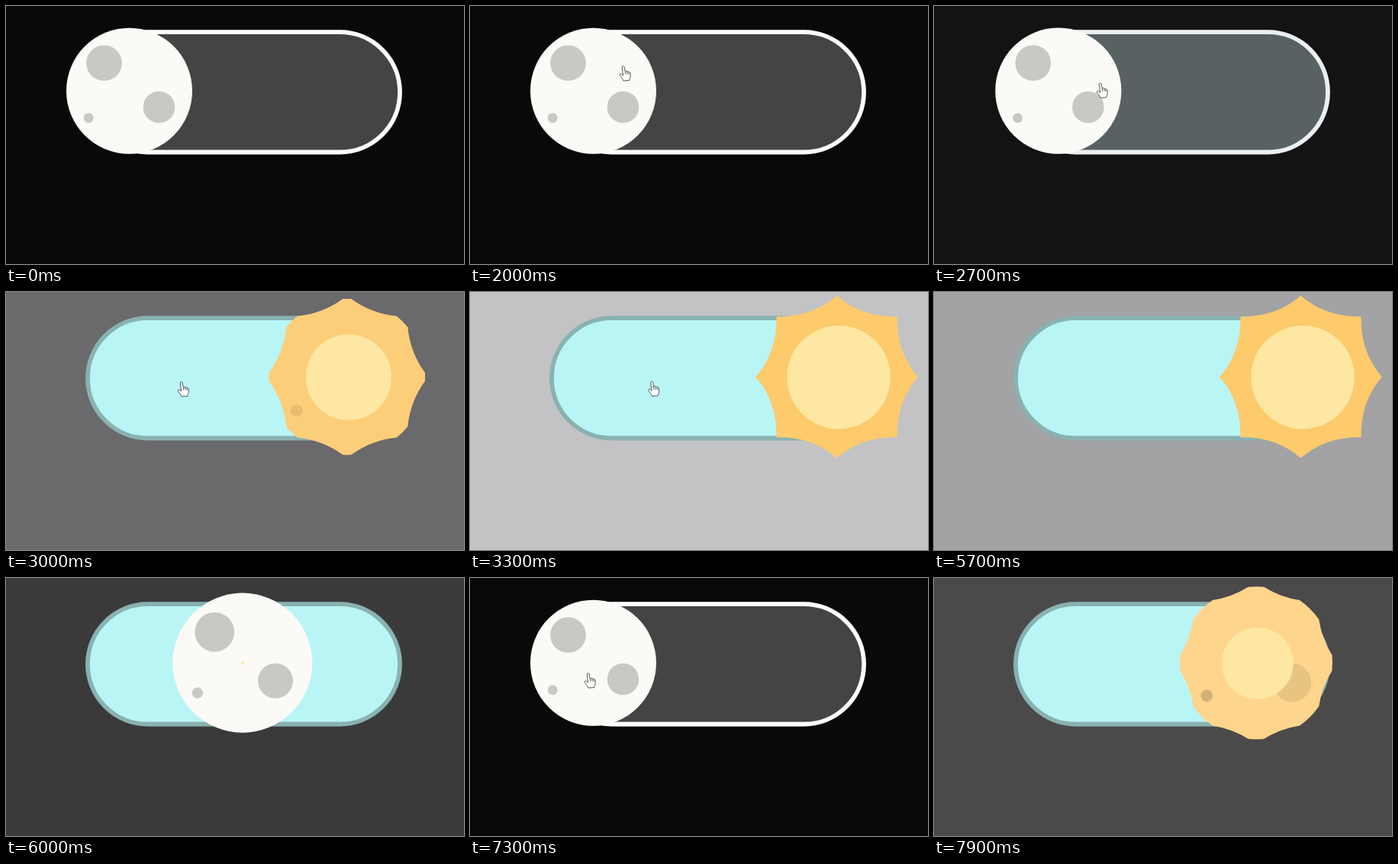
Write an HTML page with a canvas that moves like this. It is 600 by 338 pixels and loops after 8000 ms.

```html
<!DOCTYPE html>
<html lang="en">
<head>
<meta charset="utf-8">
<title>Day and night toggle</title>
<style>
html, body { margin: 0; height: 100%; overflow: hidden; background: #0a090a; }
canvas { display: block; }
</style>
</head>
<body>
<canvas id="stage" width="600" height="338"></canvas>
<script>
const ctx = document.getElementById('stage').getContext('2d');
const LOOP = 8000, LENGTH = 0.9, R = 82.5, TAU = Math.PI * 2;

const lerp = (a, b, t) => a + (b - a) * t;
const clamp = t => Math.max(0, Math.min(1, t));
const span = (t, start, length) => clamp((t - start) / length);
const inOut = t => t < .5 ? 4 * t ** 3 : 1 - 4 * (1 - t) ** 3;
const out = (t, power) => 1 - (1 - t) ** power;
const mix = (a, b, t) => `rgb(${a.map((v, i) => Math.round(lerp(v, b[i], t)))})`;

// Value i at time t from key points [time, ...values]
function keyed(t, keys, i = 1) {
  const n = keys.findIndex(k => t < k[0]);
  if (n < 0) return keys[keys.length - 1][i];
  if (!n) return keys[0][i];
  const a = keys[n - 1], b = keys[n];
  return lerp(a[i], b[i], (t - a[0]) / (b[0] - a[0]));
}

const DAWN = [[0, 0], [.32, .28], [.35, .42], [.8, 1]];

const CRATERS = [
  { x: -33, y: -36.5, r: 23.4 },
  { x: 39, y: 21.3, r: 20.8 },
  { x: -53.3, y: 35.5, r: 6.5 }
];

// Cursor moves: [ms, x, y]; hidden between them
const MOVES = [
  [[600, 563, 291], [800, 485, 296], [1700, 221, 132], [2000, 203, 88], [2300, 204, 88],
   [3000, 232, 127], [3500, 246, 126], [4600, 497, 100], [5600, 498, 106]],
  [[6500, 511, 325], [7100, 97, 50], [7300, 157, 134], [7700, 157, 134]]
];

// Seconds from night to day; the second click plays backwards
function timeline(ms) {
  const run = start => LENGTH * span(ms, start, LENGTH * 1000);
  return run(2650) - run(5345) + run(7580);
}

function disc(x, y, r) {
  ctx.beginPath();
  ctx.arc(x, y, r, 0, TAU);
  ctx.fill();
}

// Eight arcs narrow to points while hollow curves open between them
function body(m) {
  const step = TAU / 8, dip = lerp(R, 65.5, m ** 3);
  const half = i => step / 2 * (1 - m ** (1 + i % 2));
  ctx.beginPath();
  for (let i = 0; i < 8; i++) {
    const r = j => R * (1 + j % 2 * .05 * span(m, .85, .15));
    const a = i * step, next = a + step - half(i + 1);
    const mid = (a + half(i) + next) / 2;
    ctx.arc(0, 0, r(i), a - half(i), a + half(i));
    ctx.quadraticCurveTo(dip * Math.cos(mid), dip * Math.sin(mid),
      r(i + 1) * Math.cos(next), r(i + 1) * Math.sin(next));
  }
  ctx.fill();
}

const hand = new Path2D(
  'M-3.8-8C-3.8-9.7-1-9.8-.8-8L.2-2.4C.8-3.5 2.5-3.2 2.7-2C3.5-2.8 4.8-2.4 5-1.2' +
  'C6-1.8 7.1-1.1 7.1 0L7.2 4.2C7.2 6 6 7 5.8 9.5L-2 10C-2.6 7.6-5.2 5.3-6.8 2.5' +
  'C-7.4 1-5.4 .3-4.2 1.5L-2.4 3Z M.2-2.4L.8 1.4 M2.7-2L3.2 1.4 M5-1.2L5.3 1.6');

function cursor(ms) {
  const move = MOVES.find(k => ms >= k[0][0] && ms < k[k.length - 1][0]);
  if (!move) return;
  ctx.save();
  ctx.translate(keyed(ms, move, 1), keyed(ms, move, 2));
  ctx.fillStyle = '#fff';
  ctx.fill(hand);
  ctx.strokeStyle = '#444';
  ctx.lineWidth = .9;
  ctx.lineJoin = 'round';
  ctx.stroke(hand);
  ctx.restore();
}

function draw(ms) {
  const t = timeline(ms);
  const track = span(t, .02, .18);
  const morph = out(span(t, .2415, .28), 4);
  const tint = out(span(t, .26, .24), 5);
  const scale = 1 + .29 * inOut(span(t, 0, .54));

  ctx.fillStyle = mix([10, 9, 10], [239, 238, 240], keyed(t, DAWN));
  ctx.fillRect(0, 0, 600, 338);

  ctx.beginPath();
  ctx.roundRect(107, 34.2, 409, 157.3, 78.6);
  ctx.fillStyle = mix([68, 68, 68], [186, 245, 246], track);
  ctx.fill();
  ctx.strokeStyle = mix([254, 253, 254], [136, 178, 177], track);
  ctx.lineWidth = 5.8;
  ctx.stroke();

  ctx.save();
  ctx.translate(lerp(161.5, 480.5, inOut(span(t, 0, .5))), 111.2);
  ctx.scale(scale, scale);
  ctx.fillStyle = mix([252, 250, 246], [253, 202, 108], tint);
  body(morph);
  CRATERS.forEach((c, i) => {
    ctx.fillStyle = `rgba(0,0,0,${.2 * (1 - span(t, .25 + .03 * i, .07))})`;
    disc(c.x, c.y, c.r);
  });
  ctx.fillStyle = '#fee7a3';
  disc(2 * morph, .4, 52.5 * morph);
  ctx.restore();

  cursor(ms);
}

function frame() {
  draw(performance.now() % LOOP);
  requestAnimationFrame(frame);
}
frame();
</script>
</body>
</html>
```
